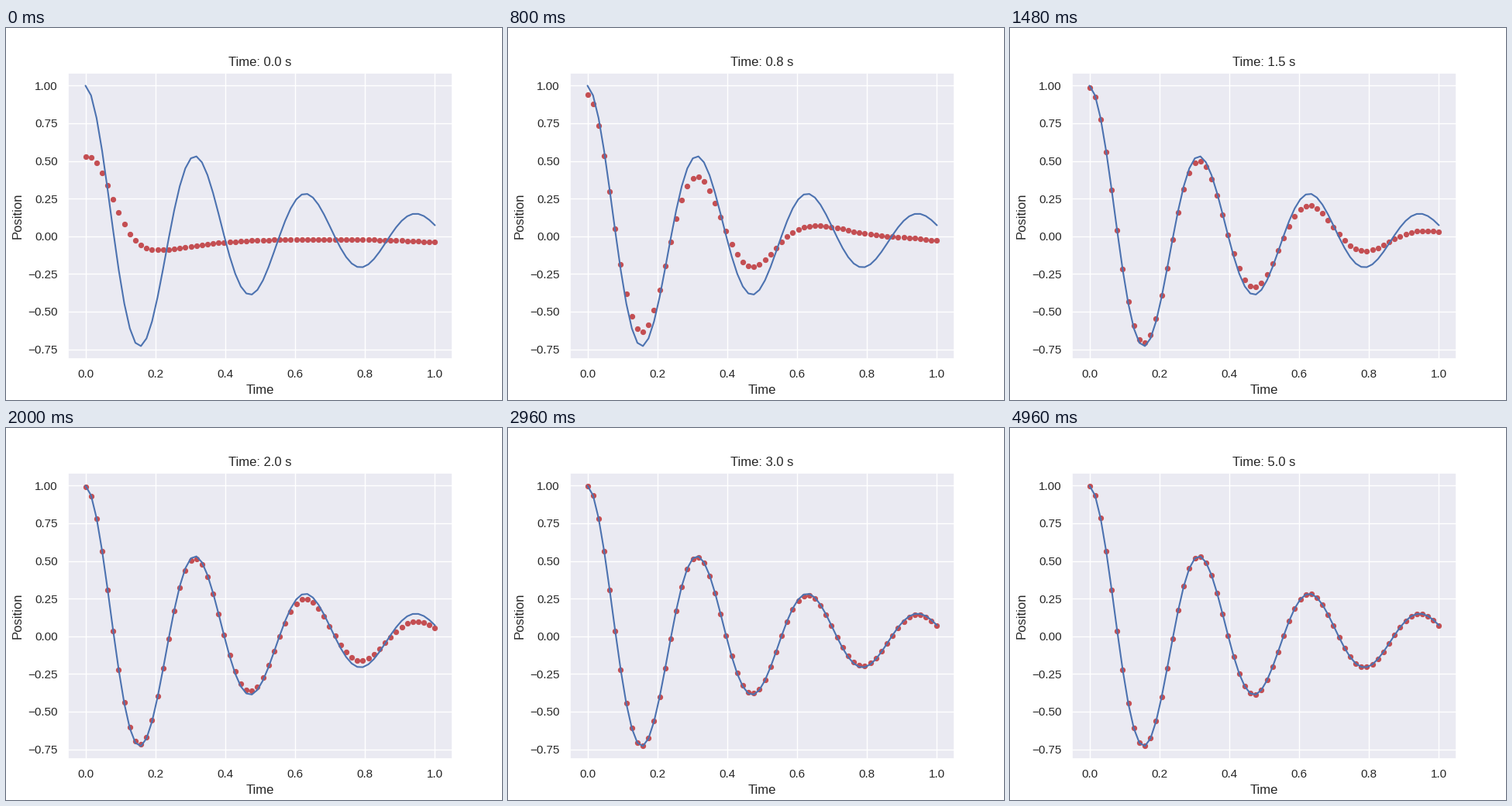
Write a matplotlib script that moves like this. It is 640 by 480 pixels and loops after 5000 ms.

```python
import numpy as np
import matplotlib.pyplot as plt
from matplotlib.animation import FuncAnimation

FRAMES, STEP_MS = 125, 40
DAMPING, OMEGA = 2.0, 19.9
BLUE, RED, PANEL, INK = "#4C72B0", "#C44E52", "#EAEAF2", "0.15"

plt.rcParams.update({
    "font.family": "Liberation Sans",
    "text.color": INK,
    "axes.labelcolor": INK,
})

t = np.linspace(0, 1, 64)
decay = np.exp(-DAMPING * t)
sine = np.sin(OMEGA * t)
exact = decay * (np.cos(OMEGA * t) + 0.05 * sine)

# The fit converges from left to right: later points catch up later
ease = t * t * (3 - 2 * t)
arrival = 0.29 + 0.7 * t + 0.88 * ease**2
sharpness = 2.6 + 4 * t**3


def sigmoid(x):
    return 1 / (1 + np.exp(-x))


def background(seconds):
    """Smooth curve the fit follows where it has not converged yet."""
    start = (1.35 * sigmoid(25.3 * (0.0667 - t)) - 0.534 * np.exp(-9 * t)
             - 0.018 - 0.146 * (t - 0.63)**2)
    ripple = 0.034 * np.sin(12 * np.maximum(t - 0.64, 0))
    early = max(0, 1 - seconds / 0.8)
    late = max(0, 1 - abs(seconds - 0.8) / 0.68)
    return early * start + late * ripple


def fit(seconds):
    progress = seconds * (1 + 0.5 * np.exp(-6 * seconds**2)) + 0.02
    gain = sigmoid(sharpness * np.log(progress / arrival))
    lag = 0.21 * (1 - gain) * gain / (gain + 0.04)
    return gain * exact + lag * decay * sine + (1 - gain) * background(seconds)


fig, ax = plt.subplots(figsize=(6.4, 4.8), dpi=100, facecolor="white")
fig.subplots_adjust(left=0.125, right=0.9, bottom=0.11, top=0.88)
ax.set_facecolor(PANEL)
ax.set_axisbelow(True)
ax.grid(color="white", linewidth=1, solid_capstyle="round")
ax.tick_params(length=0, pad=9.5, labelsize=11, labelcolor=INK)
for spine in ax.spines.values():
    spine.set(color="white", linewidth=1.25)

margin = 0.05 * np.ptp(exact)
ax.set_xlim(-0.05, 1.05)
ax.set_ylim(exact.min() - margin, exact.max() + margin)
ax.set_xlabel("Time", fontsize=12)
ax.set_ylabel("Position", fontsize=12)
title = ax.set_title("Time: 0.0 s", fontsize=12)

dots = ax.scatter(t, fit(0), s=20, color=RED, linewidths=0.75, zorder=1)
ax.plot(t, exact, color=BLUE, linewidth=1.5, solid_capstyle="round", zorder=2)


def draw(frame):
    seconds = frame * STEP_MS / 1000
    dots.set_offsets(np.column_stack([t, fit(seconds)]))
    title.set_text(f"Time: {seconds:.1f} s")
    return dots, title


anim = FuncAnimation(fig, draw, frames=FRAMES, interval=STEP_MS,
                     repeat=True, repeat_delay=0, blit=False)
plt.show()
```
